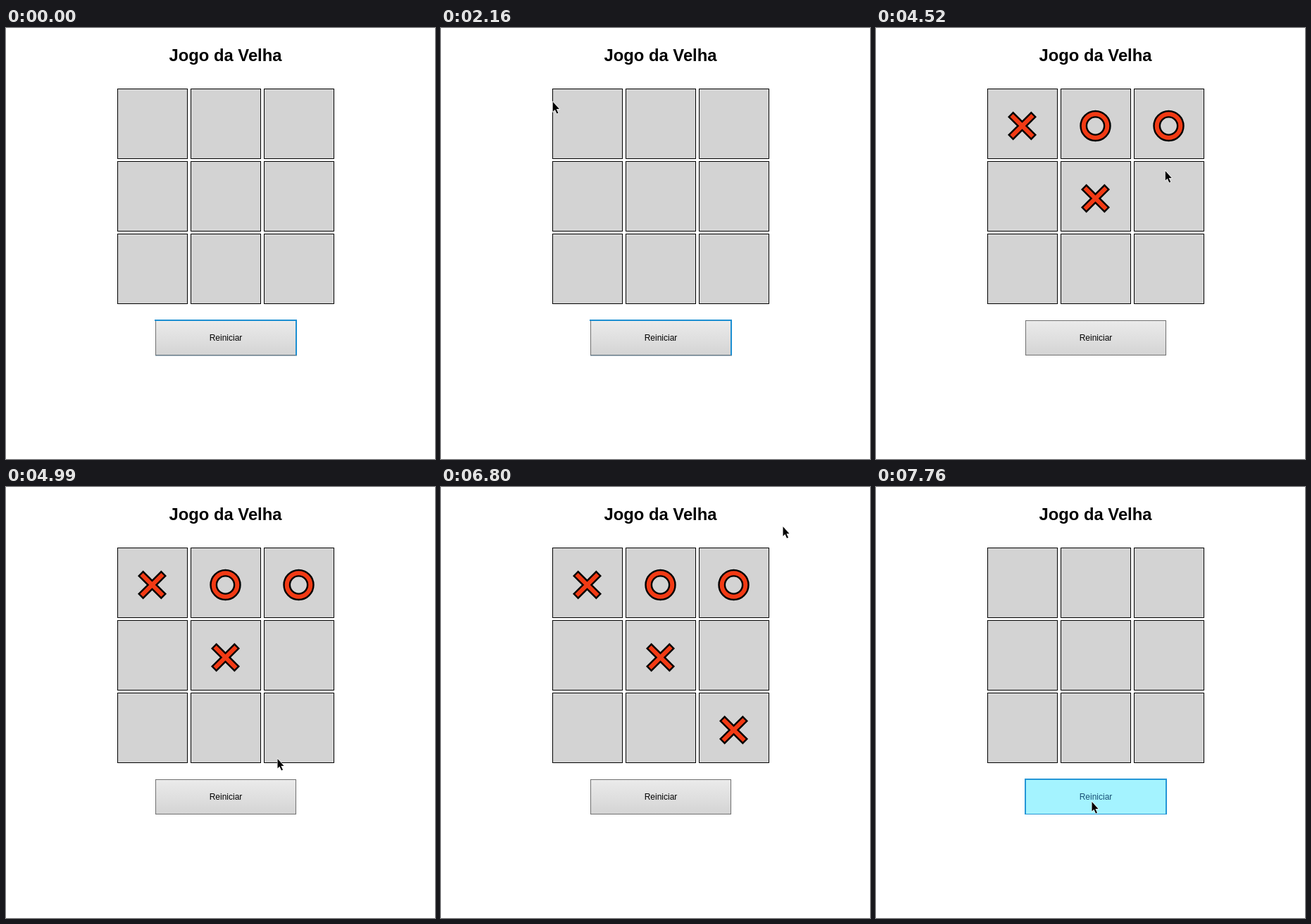
Recreate the animation shown at these times as an HTML page. Size 609 by 612 pixels, loop 8000 ms.

```html
<!DOCTYPE html>
<html lang="pt">
<head>
<meta charset="utf-8">
<title>Jogo da Velha</title>
<style>
html, body { margin: 0; width: 100%; height: 100%; overflow: hidden; background: #fff; }
svg { display: block; width: 609px; height: 612px; }
text { font-family: "Liberation Sans", Arial, sans-serif; }
.cell { fill: #d3d3d3; stroke: #000; }
.edge { fill: none; stroke: #000; stroke-width: 10.8; }
.core { fill: none; stroke: #f23a14; stroke-width: 6; }
#button rect { fill: url(#silver); stroke: #707070; }
#button.hover rect { fill: #a4f3ff; stroke: #2496d6; }
#button.hover text { fill: #174f74; }
#alert text { font-family: "Open Sans", "Noto Sans", sans-serif; }
#ok { fill: #8000d7; }
#ok.hover { fill: #9526ea; }
</style>
</head>
<body>
<svg viewBox="0 0 609 612">
  <defs>
    <linearGradient id="silver" x2="0" y2="1">
      <stop stop-color="#ebebeb"/><stop offset="1" stop-color="#d4d4d4"/>
    </linearGradient>
    <g id="X" transform="rotate(45)">
      <path class="edge" d="M-23.6 0H23.6M0-23.6V23.6"/>
      <path class="core" d="M-21.2 0H21.2M0-21.2V21.2"/>
    </g>
    <g id="O"><circle r="16.8" class="edge"/><circle r="16.8" class="core"/></g>
  </defs>

  <text x="311.5" y="47" text-anchor="middle" font-size="23.8" font-weight="bold">Jogo da Velha</text>
  <g id="board"></g>

  <g id="button">
    <rect x="212.5" y="415.5" width="199" height="49"/>
    <text x="312" y="444" text-anchor="middle" font-size="12">Reiniciar</text>
  </g>
  <path id="focus" d="M211 415H412V465" fill="none" stroke="#1c8fd2" stroke-width="2"/>
  <path id="focusBase" d="M212 465H413" stroke="#5f7f94"/>
  <path id="pressed" d="M212 465V415H412V465" fill="none" stroke="#2496d6" stroke-width="2"/>

  <g id="alert">
    <path d="M87 0H537V77a5 5 0 0 1-5 5H92a5 5 0 0 1-5-5Z" fill="#1f1228"/>
    <text x="104" y="14" font-size="11.75" fill="#c8a8e6">O jogo Acabou !! - O vencedor foi 0</text>
    <rect x="456" y="33" width="64" height="32" rx="4" fill="none" stroke="#84b4f0" stroke-width="2"/>
    <rect id="ok" x="458" y="35" width="60" height="28" rx="2"/>
    <text x="487" y="53" text-anchor="middle" font-size="12" fill="#2a1040">OK</text>
  </g>

  <path id="cursor" d="M.5 1V14.5L3.4 11.8L6 17.5L8 16.6L5.4 11H9.5Z"
    stroke="#fff" stroke-width="1.2" paint-order="stroke"/>
</svg>
<script>
const $ = id => document.getElementById(id);
const show = (id, on) => $(id).style.display = on ? "" : "none";
const LOOP = 8000, CLEAR = 7690, GLIDE = 540;

// X and O alternate: [cell, time placed]
const moves = [[0, 2900], [1, 3640], [4, 4060], [2, 4440], [8, 5050]];

// Pointer destinations: [departure time, x, y]
const stops = [
  [0, 478, 54], [70, 28, 331], [430, 53, 127], [1080, 30, 241], [1570, 66, 284],
  [1720, 159, 103], [2420, 189, 131], [2900, 312, 157], [3770, 308, 238],
  [4080, 417, 153], [4480, 385, 385], [5320, 350, 371], [5790, 486, 53], [6800, 306, 446]
];

const cellX = i => 158 + 104 * (i % 3);
const cellY = i => 86 + 103 * Math.floor(i / 3);
let board = "";
for (let i = 0; i < 9; i++)
  board += `<rect class="cell" x="${cellX(i) + .5}" y="${cellY(i) + .5}" width="99" height="99"/>`;
moves.forEach(([cell], i) =>
  board += `<use id="move${i}" href="#${"XO"[i % 2]}" x="${cellX(cell) + 49.5}" y="${cellY(cell) + 53}"/>`);
$("board").innerHTML = board;

// Each glide eases out and ends before the next one departs.
function pointer(t) {
  const i = stops.findLastIndex(s => s[0] <= t);
  const [depart, x, y] = stops[i];
  const [, x0, y0] = stops[Math.max(i - 1, 0)];
  const next = i + 1 < stops.length ? stops[i + 1][0] : LOOP;
  const k = Math.min(1, (t - depart) / Math.min(GLIDE, next - depart));
  const left = (1 - k) ** 3;
  return [x + (x0 - x) * left, y + (y0 - y) * left];
}

function draw(t) {
  const [x, y] = pointer(t);
  moves.forEach(([, placed], i) => show("move" + i, t >= placed && t < CLEAR));
  show("focus", t < 4440);
  show("focusBase", t < 2900);
  show("pressed", t >= CLEAR);
  show("alert", t >= 5150 && t < 6730);
  $("ok").classList.toggle("hover", x > 456 && y < 65);
  $("button").classList.toggle("hover", x > 212 && x < 412 && y > 415);
  show("cursor", t >= 70);
  $("cursor").setAttribute("transform", `translate(${x} ${y})`);
}

const start = performance.now();
function tick() {
  draw((performance.now() - start) % LOOP);
  requestAnimationFrame(tick);
}
tick();
</script>
</body>
</html>
```
